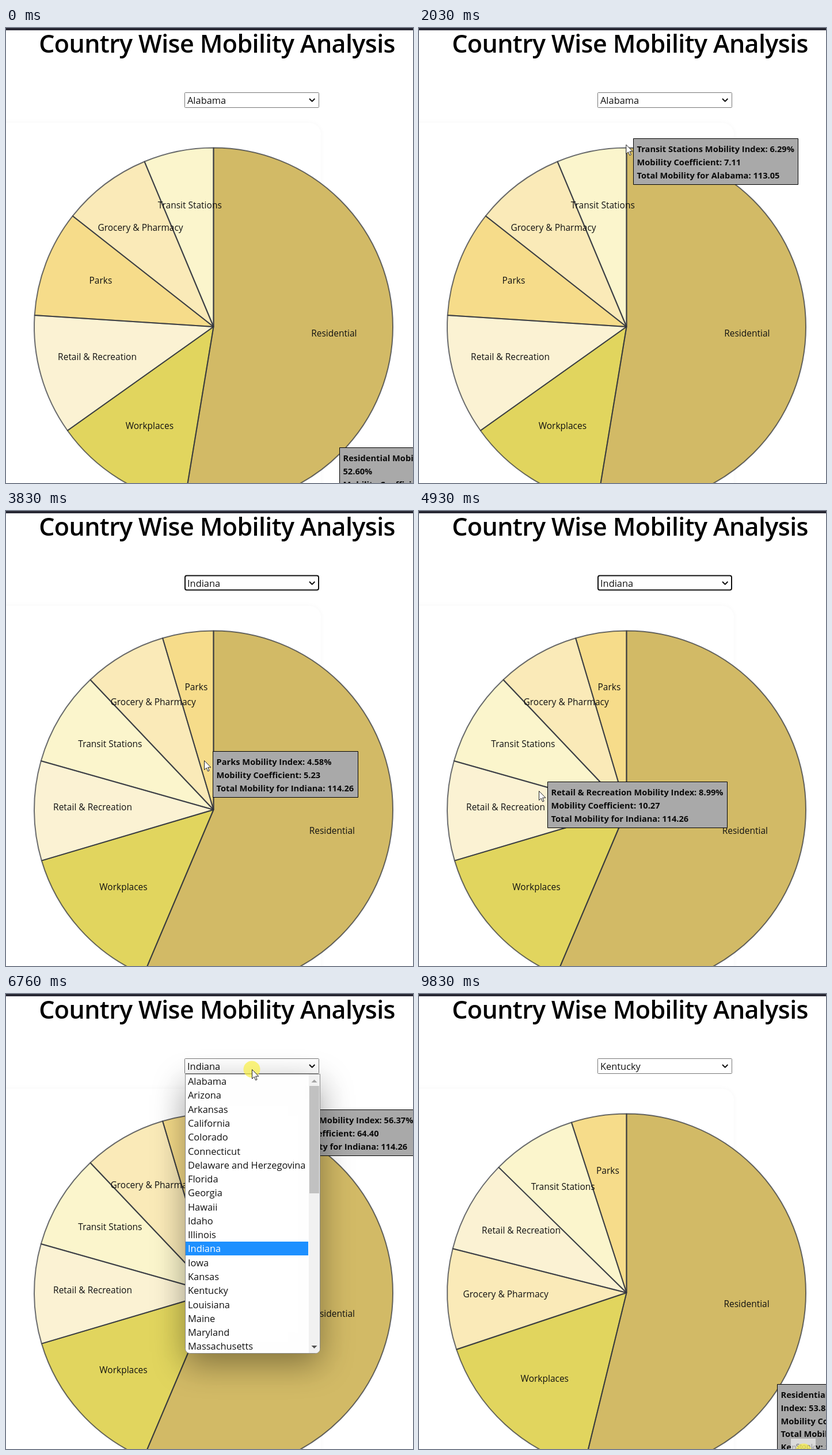
Write an HTML page with a canvas that moves like this. It is 707x792 px and loops after 9.89 s.

```html
<!DOCTYPE html>
<html lang="en">
<head>
<meta charset="utf-8">
<title>Country Wise Mobility Analysis</title>
<style>
html, body { margin: 0; width: 100%; height: 100%; overflow: hidden; background: #fff; }
canvas { display: block; }
</style>
</head>
<body>
<canvas id="stage" width="707" height="792"></canvas>
<script>
const ctx = document.getElementById('stage').getContext('2d');
const LOOP = 9890, CX = 360.5, CY = 520, R = 311.5, LABEL_R = 210;
const PAGE_RIGHT = 827, LINE = 22.8, ROW = 24.27, LIST_TOP = 140, LAG = 9;
const FONT = '"Open Sans", "Noto Sans", sans-serif';

const colors = {
  'Residential': '#d2ba66', 'Workplaces': '#e1d55e', 'Retail & Recreation': '#fbf2d3',
  'Parks': '#f6dc8a', 'Grocery & Pharmacy': '#faeab8', 'Transit Stations': '#fbf5cc'
};
// Percentages in the order of the colours above
const regions = {
  Alabama: { total: 113.05, shares: [52.6, 12.55, 10.87, 9.6, 8.09, 6.29] },
  Indiana: { total: 114.26, shares: [56.367, 14.04, 8.99, 4.58, 7.48, 8.543] },
  Kentucky: { total: 117.31, shares: [53.814, 16.05, 8.4, 4.966, 9.1, 7.67] }
};
const options = ('Alabama,Arizona,Arkansas,California,Colorado,Connecticut,Delaware and Herzegovina,Florida,' +
  'Georgia,Hawaii,Idaho,Illinois,Indiana,Iowa,Kansas,Kentucky,Louisiana,Maine,Maryland,Massachusetts').split(',');

// Each move eases on from the last one: start, end, destination, optional bend
const moves = [
  { start: 0, end: 0, to: [564, 746] },
  { start: 320, end: 810, to: [419, 440] },
  { start: 1200, end: 1620, to: [317, 346] },
  { start: 1820, end: 2300, to: [427, 123], bend: [343, 178] },
  { start: 2810, end: 3700, to: [344, 434] },
  { start: 4230, end: 4930, to: [208, 487], bend: [270, 412] },
  { start: 5390, end: 5670, to: [215, 539], bend: [180, 510] },
  { start: 5740, end: 6340, to: [432, 155], bend: [475, 300] },
  { start: 6410, end: 6610, to: [427, 131] },
  { start: 6830, end: 7580, to: [385, 512] },
  { start: 7720, end: 7860, to: [397, 525] },
  { start: 8130, end: 8260, to: [406, 525] },
  { start: 8720, end: 8860, to: [607, 695] }
];
const clicks = [2600, 3600, 6760, 7500];

const within = (t, a, b) => t >= a && t < b;
const regionAt = t => t < 3830 ? 'Alabama' : t < 7720 ? 'Indiana' : 'Kentucky';
const isOpen = t => within(t, 2600, 3830) || within(t, 6760, 7720);
const isFocused = t => within(t, 3830, 6760) || within(t, 7720, 9760);

function pointerAt(t) {
  let i = moves.length - 1;
  while (i > 0 && moves[i].start > t) i--;
  const { start, end, to, bend } = moves[i];
  const from = i ? moves[i - 1].to : to;
  const p = Math.min(1, (t - start + 70) / (end - start + 70));
  const u = p * p * (3 - 2 * p);
  return to.map((v, k) => {
    const mid = bend ? bend[k] : (from[k] + v) / 2;
    return (1 - u) ** 2 * from[k] + 2 * u * (1 - u) * mid + u * u * v;
  });
}

// The tooltip trails the pointer and stays where the pointer left the chart
function hoverAt(t) {
  for (let at = Math.floor(t); ; at--) {
    const [x, y] = pointerAt(at < LAG ? 0 : at - LAG);
    if (at <= 0 || !isOpen(at) && Math.hypot(x - CX, y - CY) < R + 1) return { at, x, y };
  }
}

function slices(region) {
  const names = Object.keys(colors);
  let sum = 0;
  return regions[region].shares
    .map((share, i) => ({ name: names[i], share }))
    .sort((a, b) => b.share - a.share)
    .map(s => ({ ...s, from: sum, to: sum += s.share }));
}

function text(str, x, y, size, { weight = 400, color = '#111', align = 'left', spacing = 0 } = {}) {
  ctx.font = `${weight} ${size}px ${FONT}`;
  ctx.fillStyle = color;
  ctx.textAlign = align;
  ctx.letterSpacing = spacing + 'px';
  ctx.fillText(str, x, y);
}

function box(x, y, w, h, fill, stroke, radius = 0, width = 1) {
  ctx.beginPath();
  ctx.roundRect(x, y, w, h, radius);
  ctx.fillStyle = fill;
  ctx.fill();
  if (!stroke) return;
  ctx.strokeStyle = stroke;
  ctx.lineWidth = width;
  ctx.stroke();
}

function shadowed(color, blur, dy, draw) {
  ctx.save();
  ctx.shadowColor = color;
  ctx.shadowBlur = blur;
  ctx.shadowOffsetY = dy;
  draw();
  ctx.restore();
}

function shape(path, x, y, fill, stroke, width = 1) {
  const p = new Path2D(path);
  ctx.save();
  ctx.translate(x, y);
  ctx.lineWidth = width;
  if (fill) { ctx.fillStyle = fill; ctx.fill(p); }
  if (stroke) { ctx.strokeStyle = stroke; ctx.stroke(p); }
  ctx.restore();
}

function drawPage() {
  box(0, 0, 707, 792, '#fff');
  shadowed('rgba(0,0,0,.035)', 10, 0, () => box(-40, 165, 587, 700, '#fff', null, 20));
  box(0, 0, 707, 4, '#272733');
  text('Country Wise Mobility Analysis', 366.5, 43, 43,
    { weight: 600, color: '#000', align: 'center', spacing: -0.6 });
}

function drawPie(region) {
  const angle = pct => (pct / 50 - 0.5) * Math.PI;
  const parts = slices(region);
  const trace = s => {
    ctx.beginPath();
    ctx.moveTo(CX, CY);
    ctx.arc(CX, CY, R, angle(s.from), angle(s.to));
    ctx.closePath();
  };
  for (const s of parts) {
    trace(s);
    ctx.fillStyle = colors[s.name];
    ctx.fill();
  }
  ctx.strokeStyle = 'rgba(43,47,58,.7)';
  ctx.lineWidth = 2;
  ctx.lineJoin = 'bevel';
  for (const s of parts) {
    trace(s);
    ctx.stroke();
  }
  for (const s of parts) {
    const mid = angle((s.from + s.to) / 2);
    text(s.name, CX + LABEL_R * Math.cos(mid), CY + LABEL_R * Math.sin(mid), 15.5, { align: 'center' });
  }
}

function wrap(str, max) {
  const lines = [];
  let line = '';
  for (const word of str.split(' ')) {
    const next = line ? line + ' ' + word : word;
    if (line && ctx.measureText(next).width > max) {
      lines.push(line);
      line = word;
    } else line = next;
  }
  return [...lines, line];
}

function drawTooltip(t) {
  const hover = hoverAt(t);
  const region = regionAt(hover.at), { total } = regions[region];
  const turn = Math.atan2(hover.x - CX, CY - hover.y) / (2 * Math.PI);
  const pct = (turn + 1) % 1 * 100;
  const parts = slices(region);
  const hit = parts.find(s => pct < s.to) || parts[parts.length - 1];
  const x = Math.round(hover.x + 15), y = Math.round(hover.y - 16);

  ctx.font = `700 14.65px ${FONT}`;
  ctx.letterSpacing = '0px';
  const lines = [
    `${hit.name} Mobility Index: ${hit.share.toFixed(2)}%`,
    `Mobility Coefficient: ${(hit.share * total / 100).toFixed(2)}`,
    `Total Mobility for ${region}: ${total.toFixed(2)}`
  ].flatMap(l => wrap(l, PAGE_RIGHT - x - 13));
  const width = Math.max(...lines.map(l => ctx.measureText(l).width));
  box(x + 0.5, y + 0.5, Math.round(width) + 13, Math.round(lines.length * LINE) + 12, '#a9a9a9', '#000');
  lines.forEach((l, i) => text(l, x + 6.5, y + 24 + i * LINE, 14.65, { weight: 700, color: '#0a0a0a' }));
}

function drawSelect(t) {
  if (isFocused(t)) box(311, 112.5, 232, 25, '#fff', '#101010', 3, 2);
  else box(310.5, 112.5, 233, 26, '#fff', '#767676', 1);
  text(regionAt(t), 315, 131.5, 16.4);
  shape('M-4.7 -2.4 L0 2.3 L4.7 -2.4', 531.7, 125.4, null, '#111', 2);
}

function drawList(t, y) {
  shadowed('rgba(0,0,0,.38)', 56, 18, () => box(311.5, 139.5, 234, 486, '#fff', '#8a8a8a', [0, 0, 8, 8]));
  const hover = y > LIST_TOP ? Math.floor((y - LIST_TOP) / ROW) : options.indexOf(regionAt(t));
  options.forEach((name, i) => {
    const top = LIST_TOP + i * ROW;
    if (i === hover) box(312, Math.round(top), 213, 24, '#1e90ff');
    text(name, 316, top + 18.2, 16.4, { color: i === hover ? '#fff' : '#111' });
  });
  box(526, 140, 19, 485, '#f1f1f1', null, [0, 0, 7, 0]);
  box(527, 160, 17, 187, '#c1c1c1');
  shape('M-5 3 L0 -2 L5 3Z', 535.5, 151, '#a3a3a3');
  shape('M-5 -3 L0 2 L5 -3Z', 535.5, 615, '#505050');
}

function spot(x, y) {
  ctx.beginPath();
  ctx.arc(x, y, 14.5, 0, 2 * Math.PI);
  ctx.fillStyle = 'rgba(250,240,70,.7)';
  ctx.fill();
}

function drawPointer(t, x, y) {
  if (clicks.some(c => within(t, c, c + 220))) spot(x, y);
  if (within(t, 8260, 8720)) shape('M-3 -8 H3 M0 -8 V8 M-3 8 H3', 453.5, 538, null, '#777');
  else if (within(t, 320, 8860)) {
    shape('M0 0 V16 L3.7 12.6 L6.2 18.5 L8.6 17.5 L6.1 11.7 H11.3Z', x + 0.5, y + 0.5, '#fff', '#222');
  }
}

function drawStop() {
  box(646, 774, 43, 30, 'rgba(235,235,235,.75)');
  text('Stop', 667.5, 792, 12, { color: '#666', align: 'center' });
  spot(668, 797);
}

function frame() {
  const t = performance.now() % LOOP;
  const [x, y] = pointerAt(t);
  drawPage();
  drawPie(regionAt(t));
  drawTooltip(t);
  drawSelect(t);
  if (isOpen(t)) drawList(t, y);
  drawPointer(t, x, y);
  if (t >= 9760) drawStop();
  requestAnimationFrame(frame);
}
frame();
</script>
</body>
</html>
```
